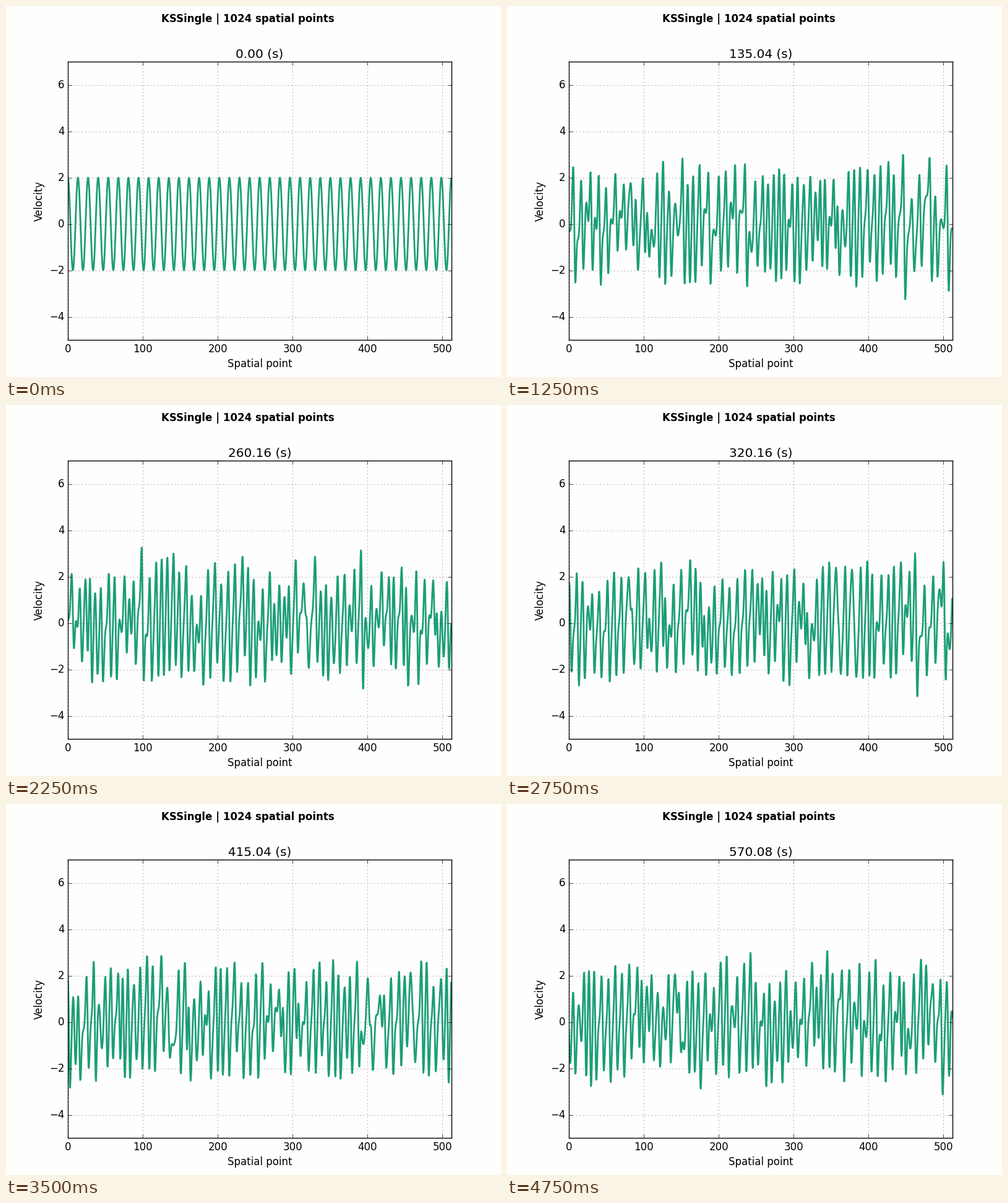
Write a matplotlib script that moves like this. It is 800 px wide and 600 px high and loops after 5 s.

```python
import matplotlib.pyplot as plt
import numpy as np
from matplotlib.animation import FuncAnimation
from matplotlib.transforms import ScaledTranslation

plt.style.use("classic")
plt.rcParams["font.family"] = "DejaVu Sans"

PAPER = "#fefefd"
GREEN = "#1b9e77"
FRAMES, INTERVAL = 20, 250
N, DX, DT = 1024, 0.5, 0.16
L = N * DX
OUTPUT_EVERY = 5.0


def step_index(frame):
    """Solver step on display: outputs every 5 s, played at 40 ms each."""
    out = max(0, (INTERVAL * frame - 155) // 40)
    return int(OUTPUT_EVERY * out / DT) + 1 if out else 0


def solve(u, steps):
    """Kuramoto-Sivashinsky equation, central differences in space, ETDRK4."""
    theta = 2 * np.pi * np.fft.rfftfreq(N)
    grad = 1j * np.sin(theta) / DX
    lap = (2 * np.cos(theta) - 2) / DX**2
    lin = -lap - lap**2
    e1, e2 = np.exp(DT * lin), np.exp(DT * lin / 2)
    roots = np.exp(1j * np.pi * (np.arange(1, 33) - 0.5) / 32)
    z = DT * lin[:, None] + roots
    ez = np.exp(z)

    def weight(f):
        return DT * f.mean(axis=1).real

    q = weight((np.exp(z / 2) - 1) / z)
    f1 = weight((-4 - z + ez * (4 - 3 * z + z**2)) / z**3)
    f2 = weight((2 + z + ez * (z - 2)) / z**3)
    f3 = weight((-4 - 3 * z - z**2 + ez * (4 - z)) / z**3)

    def advect(v):
        return -0.5 * grad * np.fft.rfft(np.fft.irfft(v, N) ** 2)

    states = {0: u}
    v = np.fft.rfft(u)
    for n in range(1, max(steps) + 1):
        nv = advect(v)
        a = e2 * v + q * nv
        na = advect(a)
        b = e2 * v + q * na
        nb = advect(b)
        c = e2 * a + q * (2 * nb - nv)
        v = e1 * v + f1 * nv + 2 * f2 * (na + nb) + f3 * advect(c)
        if n in steps:
            states[n] = np.fft.irfft(v, N)
    return states


# The wave train stays regular until tiny noise has grown into chaos.
x = np.arange(N) * DX
start = 2 * np.cos(19 * np.pi * x / 128)
noise = 1e-5 * np.random.default_rng(4).standard_normal(N)
states = solve(start + noise, {step_index(i) for i in range(FRAMES)})

fig = plt.figure(figsize=(8, 6), dpi=100, facecolor=PAPER)
ax = fig.add_axes([0.125, 0.1, 0.775, 0.75], facecolor=PAPER)
ax.set(xlim=(0, L), ylim=(-5, 7), xlabel="Spatial point", ylabel="Velocity",
       xticks=range(0, 501, 100), yticks=range(-4, 7, 2))
ax.grid(True, color="0.4")

# Tick centres fall on half pixels; nudge the labels so all round downwards.
nudge = ScaledTranslation(0, -2e-4, fig.dpi_scale_trans)
for label in ax.get_yticklabels():
    label.set_transform(label.get_transform() + nudge)

fig.text(391 / 800, 1 - 26 / 600, "KSSingle | 1024 spatial points",
         ha="center", va="baseline", weight="bold", size=12)
line, = ax.plot(x, start, color=GREEN, lw=2)
title = ax.set_title("0.00 (s)")


def update(frame):
    n = step_index(frame)
    line.set_ydata(states[n])
    title.set_text(f"{n * DT:.2f} (s)")
    return line, title


anim = FuncAnimation(fig, update, frames=FRAMES, interval=INTERVAL,
                     init_func=lambda: update(0), repeat=True, repeat_delay=0)
plt.show()
```
